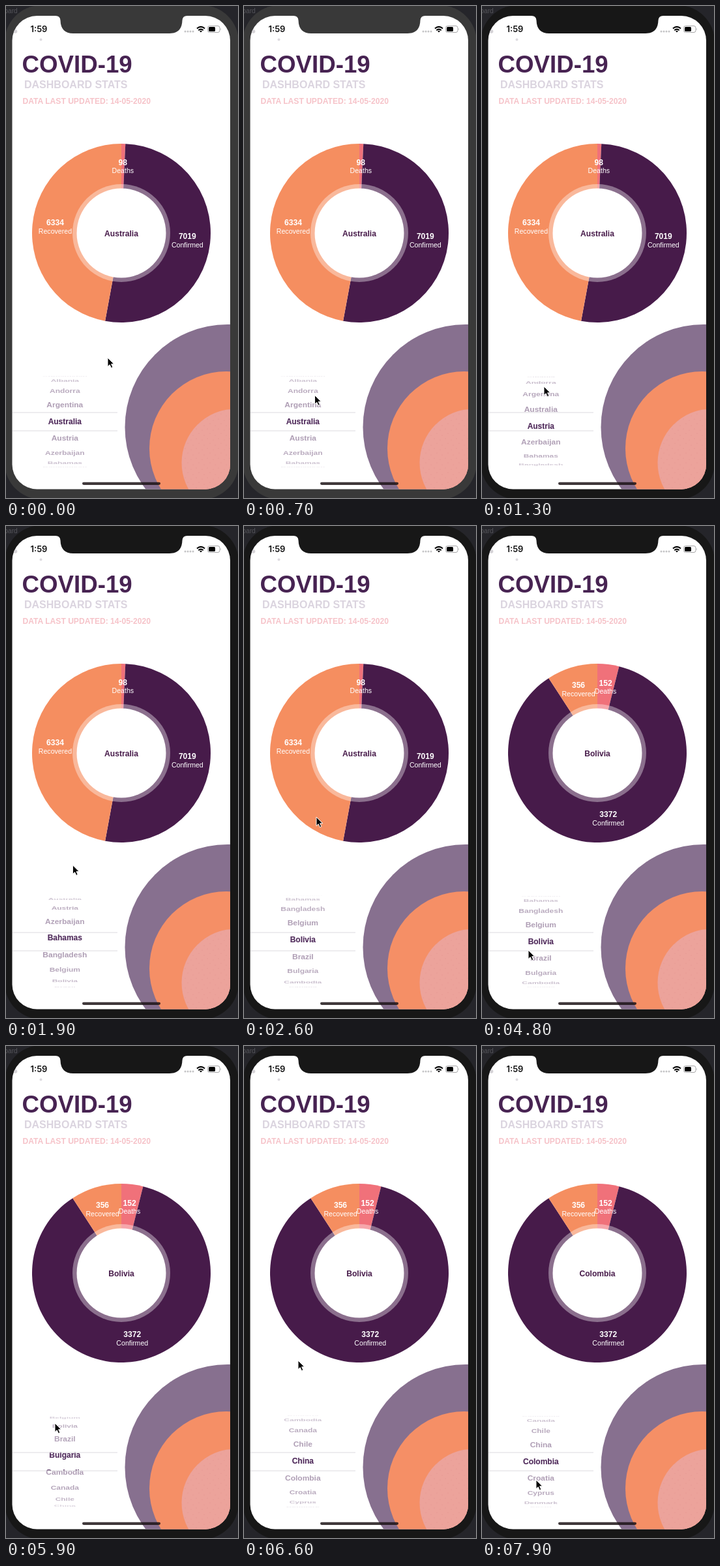
An HTML page that plays this animation: 356x754 px, repeating every 8 s.

```html
<!DOCTYPE html>
<html lang="en">
<head>
<meta charset="utf-8">
<title>COVID-19 dashboard</title>
<style>
  html, body { margin: 0; width: 100%; height: 100%; overflow: hidden; background: #25252a; }
  svg { display: block; width: 100vw; height: 100vh; }
  text { font-family: "Liberation Sans", Arial, sans-serif; }
  .bold { font-weight: 700; }
  .mid { text-anchor: middle; }
  #picker text { font-size: 12px; font-weight: 700; text-anchor: middle; }
</style>
</head>
<body>
<svg viewBox="0 0 356 754">
  <defs>
    <clipPath id="screen"><rect x="9.5" y="15" width="334.5" height="725.5" rx="38"/></clipPath>
    <clipPath id="band"><rect x="10" y="623" width="161" height="28"/></clipPath>
    <pattern id="dots" width="17" height="15" patternUnits="userSpaceOnUse">
      <g fill="#e18d8b">
        <circle cx="3" cy="3" r=".6"/><circle cx="12" cy="5" r=".5"/>
        <circle cx="7" cy="10" r=".6"/><circle cx="15" cy="13" r=".5"/>
      </g>
    </pattern>
  </defs>

  <rect width="356" height="754" fill="#25252a"/>
  <text x="-8" y="11" font-size="10" fill="#55555b">board</text>
  <rect id="bezel" x="-2" y="-1" width="359" height="757" rx="56"/>

  <g clip-path="url(#screen)">
    <rect width="356" height="754" fill="#fff"/>
    <circle cx="340" cy="645.5" r="157.5" fill="#87708f"/>
    <circle cx="338" cy="678" r="118" fill="#f58f66"/>
    <circle cx="352" cy="700" r="82.5" fill="#eca39b"/>
    <circle cx="352" cy="700" r="82.5" fill="url(#dots)"/>
    <circle cx="53.5" cy="51.5" r="2" fill="#dedbe0"/>
    <circle cx="14.5" cy="39" r="2.8" fill="#d5d3d7"/>

    <g class="bold">
      <text x="24.5" y="102" font-size="36.7" fill="#472352">COVID-19</text>
      <text x="28" y="125.5" font-size="16" fill="#dbd4df">DASHBOARD STATS</text>
      <text x="25.5" y="150" font-size="12.1" fill="#f6c3c9">DATA LAST UPDATED: 14-05-2020</text>
    </g>

    <g id="pie"></g>
    <circle cx="177" cy="348" r="75" fill="#fff" opacity=".37"/>
    <circle cx="177" cy="348" r="68.5" fill="#fff"/>
    <g id="labels" class="mid" fill="#fff"></g>
    <text id="country" class="bold mid" x="177" y="353" font-size="12.1" fill="#471b4a"></text>

    <g id="picker">
      <g id="faded" fill="#4f2a5c"></g>
      <g clip-path="url(#band)"><g id="chosen" fill="#54305f"></g></g>
    </g>
    <path d="M10 623H171M10 651H171" stroke="#dcdadf"/>
    <rect x="117" y="729.7" width="120" height="4.2" rx="2.1" fill="#1a1214" opacity=".83"/>
  </g>

  <path id="notch" d="M76 14V15Q83 15 83.500 22Q84 42 103 42H251Q270 42 270.500 22Q271 15 278 15V14Z"/>
  <text x="37.500" y="40" style="font:600 13px Inter,Roboto,sans-serif" fill="#111">1:59</text>
  <g fill="#c4c4c6">
    <circle cx="275" cy="39" r="1.5"/><circle cx="279" cy="39" r="1.5"/>
    <circle cx="283" cy="39" r="1.5"/><circle cx="287" cy="39" r="1.5"/>
  </g>
  <g fill="none" stroke="#000" stroke-width="2">
    <path d="M293 34.500Q299 29.300 305 34.500M295.300 37.200Q299 34 302.700 37.200"/>
    <path d="M297 38.400Q299 37 301 38.400L299 40.500Z" fill="#000" stroke="none"/>
  </g>
  <rect x="309.500" y="30.500" width="18.500" height="10" rx="3" fill="none" stroke="#a5a5a7"/>
  <rect x="311" y="32" width="10" height="7" rx="1.500"/>
  <path d="M329.300 34Q331 35.500 329.300 37Z" fill="#a5a5a7"/>

  <path id="cursor" d="M0 0V13.600L3.200 10.700L5.400 15.700L7.800 14.600L5.600 9.800H9.800Z"
        fill="#000" stroke="#fff" stroke-width="1" stroke-linejoin="round"/>
</svg>
<script>
const LOOP = 8000, STEP = 100;
const CX = 177, CY = 348;
const countries = ("Afghanistan Albania Andorra Argentina Australia Austria Azerbaijan Bahamas " +
  "Bangladesh Belgium Bolivia Brazil Bulgaria Cambodia Canada Chile China Colombia " +
  "Croatia Cyprus Denmark Egypt Estonia").split(" ");
const kinds = [["Deaths", "#f0717a"], ["Confirmed", "#471b4a"], ["Recovered", "#f58e60"]];
const before = [98, 7019, 6334], after = [152, 3372, 356];

// time, picker position
const scroll = [[0, 4], [1130, 4], [1300, 4.75], [2600, 10.12], [2800, 10.12], [3100, 10],
  [5450, 10], [5900, 12.4], [6600, 16.04], [7000, 17.3], [7200, 17.3], [7500, 17]];
// time, x, y
const pointer = [[0, 156, 539], [900, 95, 613], [1050, 95, 613], [1300, 95, 583],
  [2600, 111, 446], [2900, 111, 446], [3700, 80, 610], [4600, 71, 650], [5350, 71, 650],
  [5900, 75, 578], [6600, 83, 482], [7000, 85, 448], [7200, 85, 448], [7500, 85, 540],
  [7600, 85, 540], [7900, 83, 665]];

const $ = id => document.getElementById(id);
const clamp = v => Math.max(0, Math.min(1, v));

function add(parent, tag, attrs, content = "") {
  const el = document.createElementNS("http://www.w3.org/2000/svg", tag);
  for (const key in attrs) el.setAttribute(key, attrs[key]);
  el.textContent = content;
  return parent.appendChild(el);
}

function sample(track, t) {
  const i = track.findIndex(key => key[0] > t);
  if (i < 0) return track[track.length - 1].slice(1);
  const a = track[i - 1], b = track[i], k = (t - a[0]) / (b[0] - a[0]);
  return a.slice(1).map((v, n) => v + (b[n + 1] - v) * k);
}

const slices = kinds.map(([name, fill]) => {
  const label = add($("labels"), "g", {});
  return {
    path: add($("pie"), "path", { fill }),
    label,
    count: add(label, "text", { y: -2.2, "font-size": 12.1, "font-weight": 700 }),
    name: add(label, "text", { y: 10.4, "font-size": 10.6 }, name)
  };
});

const rows = countries.map(name => ["faded", "chosen"].map(id => add($(id), "text", { y: 4.2 }, name)));

function polar(turn, r) {
  const a = turn * 2 * Math.PI;
  return [CX + r * Math.sin(a), CY - r * Math.cos(a)];
}

function drawPie(t) {
  const k = 1 - (1 - clamp((t - 4100) / 700)) ** 3;
  const values = before.map((v, i) => v + (after[i] - v) * k);
  const total = values.reduce((a, b) => a + b);
  const shown = k > 0 ? after : before;
  let start = 0;
  slices.forEach((slice, i) => {
    const share = values[i] / total, end = start + share;
    slice.path.setAttribute("d", `M${CX} ${CY}L${polar(start, 137)}A137 137 0 ${+(share > .5)} 1 ${polar(end, 137)}Z`);
    slice.label.setAttribute("transform", `translate(${polar(start + share / 2, 102)})`);
    slice.count.textContent = shown[i];
    start = end;
  });
}

// Rows sit on a wheel of radius 70, 21.4 degrees apart.
function drawPicker(t) {
  const [pos] = sample(scroll, t);
  rows.forEach((pair, i) => {
    const angle = (i - pos) * 21.4 * Math.PI / 180;
    const visible = Math.abs(angle) < Math.PI / 2;
    const squash = Math.cos(angle);
    for (const row of pair) {
      row.style.display = visible ? "" : "none";
      row.setAttribute("transform", `translate(90.3 ${637 + 70 * Math.sin(angle)}) scale(1 ${squash})`);
    }
    if (visible) pair[0].setAttribute("opacity", .47 * squash ** .6);
  });
}

function draw(now) {
  const t = Math.floor(now % LOOP / STEP) * STEP;
  const shell = t < 800 ? "#393939" : "#171717";
  $("bezel").setAttribute("fill", shell);
  $("notch").setAttribute("fill", shell);
  $("country").textContent = t < 3100 ? "Australia" : t < 7400 ? "Bolivia" : "Colombia";
  drawPie(t);
  drawPicker(t);
  $("cursor").setAttribute("transform", `translate(${sample(pointer, t)})`);
}

const origin = performance.now();
function tick() {
  draw(performance.now() - origin);
  requestAnimationFrame(tick);
}
tick();
</script>
</body>
</html>
```
